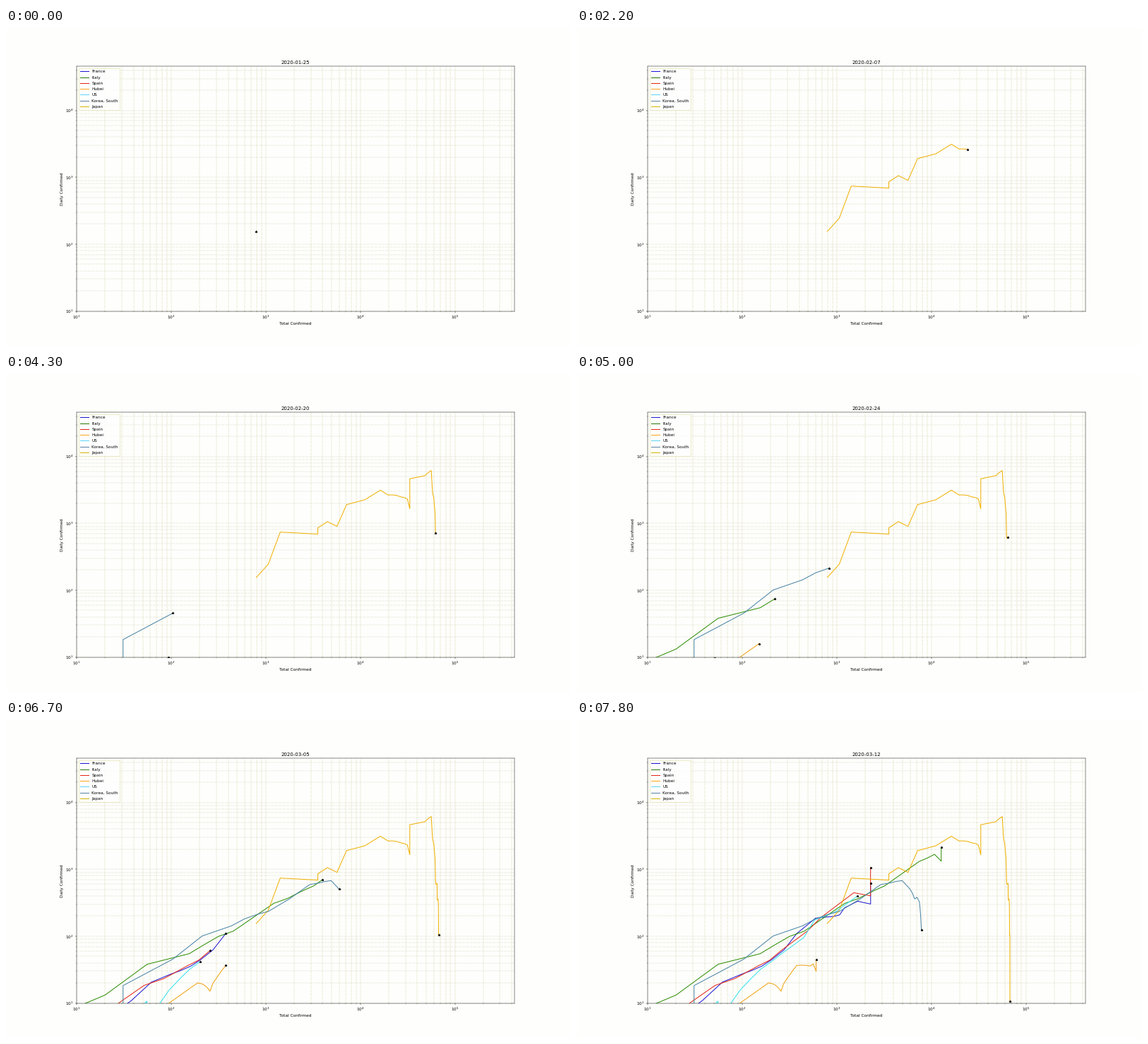
These frames come from a looping animation (800 by 450 pixels, 8000 ms). A matplotlib script:

```python
import numpy as np
import matplotlib.pyplot as plt
from matplotlib.animation import FuncAnimation
from matplotlib.lines import Line2D

SCALE = 800 / 1920       # default sizes suit a figure 1920 px wide
PX = 0.72                # one pixel in points
DAYS = np.arange(52)     # counted from 22 January
FIRST = np.datetime64("2020-01-25")
PAPER = "#fefefc"

for key in ("font.size", "axes.labelpad", "axes.titlepad", "axes.linewidth",
            "lines.markersize", "lines.markeredgewidth", "grid.linewidth",
            "patch.linewidth"):
    plt.rcParams[key] *= SCALE
for axis in ("xtick", "ytick"):
    for part in ("major.size", "minor.size", "major.pad", "major.width",
                 "minor.width"):
        plt.rcParams[f"{axis}.{part}"] *= SCALE
plt.rcParams["font.family"] = "DejaVu Sans"

# name, line colour, legend colour, no report on 12 March,
# turning points (day, total) with exponential growth in between
REGIONS = [
    ("France", "#1c14d2", "#1c14d2", True,
     [(35, 18), (36, 38), (38, 100), (41, 204), (43, 377), (45, 949),
      (47, 1209), (49, 2281), (51, 3661)]),
    ("Italy", "#2a8c00", "#2a7808", True,
     [(29, 3), (30, 20), (32, 155), (35, 453), (39, 1694), (47, 9172),
      (51, 17660)]),
    ("Spain", "#e42414", "#e42414", True,
     [(34, 6), (37, 32), (39, 84), (43, 259), (46, 673), (49, 2277),
      (51, 5232)]),
    ("Hubei", "#f0b000", "#ffa51e", False,
     [(1, 444), (5, 1423), (6, 3554), (7, 3554), (10, 7153), (11, 11177),
      (14, 19665), (18, 29631), (20, 33366), (21, 33366), (22, 48206),
      (24, 56249), (27, 61682), (30, 62662), (31, 64084), (39, 66907),
      (47, 67743), (51, 67786)]),
    ("US", "#34e0f0", "#5cd4f4", False,
     [(32, 15), (33, 51), (37, 60), (39, 74), (44, 262), (47, 583),
      (48, 959), (51, 2179)]),
    ("Korea, South", "#4682a4", "#5a80a0", False,
     [(28, 31), (29, 104), (31, 433), (33, 833), (39, 3736), (42, 5621),
      (47, 7478), (51, 7979)]),
    ("Japan", "#f0a010", "#d2b400", True,
     [(22, 28), (25, 59), (36, 214), (40, 274), (44, 420), (51, 701)]),
]


def series(points, gap):
    """Totals and the centred four-day mean of new cases, from 25 January."""
    days, totals = zip(*points)
    total = np.exp(np.interp(DAYS, days, np.log(totals)))
    if gap:
        total[50] = total[49]
    daily = (total[4:] - total[:-4]) / 4
    return total[3:-1], np.maximum(daily, 1e-3)


fig = plt.figure(figsize=(8, 4.5), dpi=100, facecolor=PAPER)
ax = fig.add_subplot(facecolor=PAPER)
ax.set(xscale="log", yscale="log", xlim=(10, 427000), ylim=(10, 46000),
       xlabel="Total Confirmed", ylabel="Daily Confirmed")
ax.set_axisbelow(True)
ax.grid(which="both", axis="x", ls=":", color="#a8a850")
ax.grid(which="both", axis="y", ls=":", color="#b0b08c")
title = ax.set_title("")

tracks, handles = [], []
for name, color, key_color, gap, points in REGIONS:
    line, = ax.plot([], [], color=color, lw=PX)
    star, = ax.plot([], [], "k*", zorder=3)
    tracks.append((*series(points, gap), line, star))
    handles.append(Line2D([], [], color=key_color, lw=PX, label=name))
ax.legend(handles=handles, loc="upper left", labelspacing=0.56,
          edgecolor="#d8d890")


def update(i):
    day = int((i + 0.5) * 0.6)   # six days a second on a 100 ms clock
    title.set_text(str(FIRST + day))
    for total, daily, line, star in tracks:
        line.set_data(total[:day + 1], daily[:day + 1])
        star.set_data(total[day:day + 1], daily[day:day + 1])
    return [title]


anim = FuncAnimation(fig, update, frames=80, interval=100, repeat=True,
                     repeat_delay=0, blit=False)
plt.show()
```
